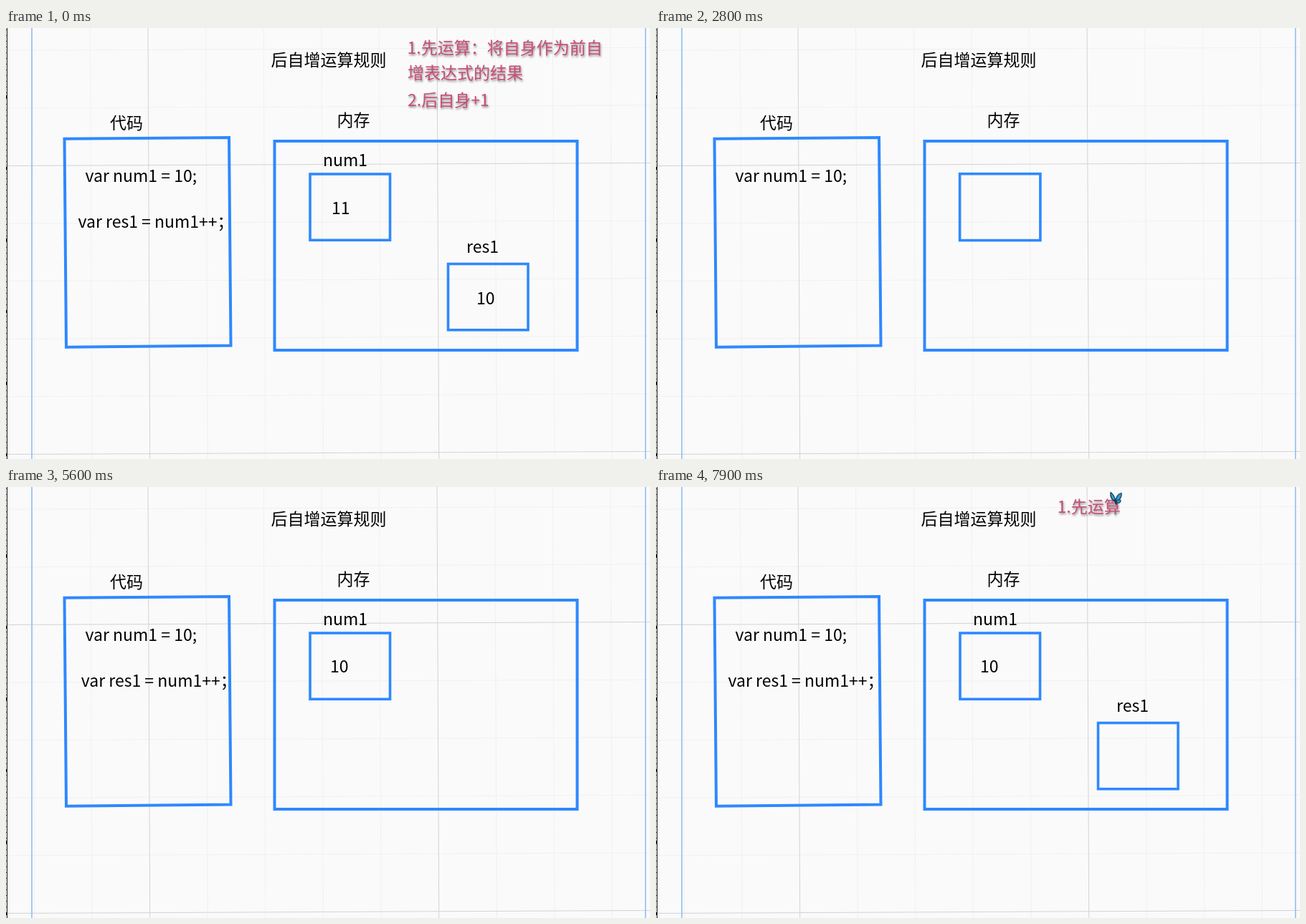
An HTML page with a canvas for the animation above (8000 ms loop, 898 by 602 pixels).

```html
<!DOCTYPE html>
<html lang="zh-CN">
<head>
<meta charset="utf-8">
<style>
  html, body { margin: 0; width: 100%; height: 100%; overflow: hidden; background: #fafafa; }
  canvas { display: block; }
</style>
</head>
<body>
<canvas id="stage" width="898" height="602"></canvas>
<script>
const ctx = document.getElementById('stage').getContext('2d');
const LOOP = 8000, STEP = 100, CLEAR = 1100;
const BLUE = '#2f88ff', PINK = '#c94c76';
const FONT = '23px "Noto Sans CJK SC", "Noto Sans CJK", "Noto Sans", sans-serif';

// [progress, value] keys; each segment eases out
const SLIDE = [[0, -3000], [.6, 25], [.75, -10], [.9, 5], [1, 0]];
const POP = [[0, .3], [.2, 1.1], [.4, .9], [.6, 1.03], [.8, .97], [1, 1]];
const easeOut = p => 1 - (1 - p) ** 3;

function sample(keys, p) {
  if (p >= 1) return keys[keys.length - 1][1];
  const i = keys.findIndex(k => k[0] > p);
  const [p0, v0] = keys[i - 1], [p1, v1] = keys[i];
  return v0 + (v1 - v0) * easeOut((p - p0) / (p1 - p0));
}

function text(str, x, y, color = '#000') {
  ctx.fillStyle = color;
  ctx.fillText(str, x, y);
}

function line(x0, y0, x1, y1, color, width = 1) {
  ctx.strokeStyle = color;
  ctx.lineWidth = width;
  ctx.beginPath();
  ctx.moveTo(x0, y0);
  ctx.lineTo(x1, y1);
  ctx.stroke();
}

function box(x, y, w, h, width = 3.6) {
  ctx.strokeStyle = BLUE;
  ctx.lineWidth = width;
  ctx.strokeRect(x, y, w, h);
}

function grid() {
  const gap = 80.6, slope = .0045;
  for (const strong of [false, true]) {
    const color = strong ? '#d3d3d3' : '#f1f1f1';
    for (let i = -2; i < 9; i++) {
      if ((i % 5 === 0) !== strong) continue;
      const x = 198 + i * gap, y = 192.5 + i * gap;
      line(x, 0, x + 602 * slope, 602, color);
      line(0, y, 898, y - 898 * slope, color);
    }
  }
}

function backdrop() {
  ctx.fillStyle = '#fafafa';
  ctx.fillRect(0, 0, 898, 602);
  grid();
  line(36, 0, 36, 602, '#8fbdf6', 1.6);
  line(891.7, 0, 891.7, 602, '#8fbdf6', 1.6);
  line(1.5, 0, 1.5, 602, '#111');
  ctx.fillStyle = '#555';
  for (let y = 2; y < 602; y += 8) ctx.fillRect(0, y, 1, 1);
  ctx.fillStyle = '#111';
  for (let y = 94; y < 602; y += 100) ctx.fillRect(0, y, 1, 4);

  text('后自增运算规则', 369.5, 53);
  text('代码', 145, 141);
  text('内存', 461.5, 137);
  ctx.strokeStyle = BLUE;
  ctx.lineWidth = 4;
  ctx.stroke(new Path2D('M81.5 154.7L311 153L313.5 443.5L84 445.7Z'));
  box(374.5, 158, 422, 292, 4);
}

function slideIn(t, start, draw) {
  const p = (t - start) / 1000;
  if (p < 0) return;
  ctx.save();
  ctx.globalAlpha = easeOut(Math.min(1, p / .6));
  ctx.translate(sample(SLIDE, p), 0);
  draw();
  ctx.restore();
}

function popIn(t, { start, cx, cy, draw, span = 1000, tilt = 0 }) {
  const p = (t - start) / span;
  if (p < 0) return;
  const s = sample(POP, p);
  ctx.save();
  ctx.translate(cx, cy);
  if (p < 1) ctx.rotate(tilt);
  ctx.scale(s, s);
  ctx.translate(-cx, -cy);
  draw();
  ctx.restore();
}

const pops = [
  { start: 2170, cx: 479.7, cy: 250.2, draw: () => box(424, 204, 111.5, 92.3) },
  { start: 3170, cx: 474, cy: 185, draw: () => text('num1', 442, 193) },
  { start: 5870, cx: 672.3, cy: 375.8, tilt: -.009, draw: () => box(616.5, 329.5, 111.5, 92.3) },
  { start: 6770, cx: 666, cy: 306, draw: () => text('res1', 642, 314) }
];
const ten = { start: 4070, cx: 465, cy: 250, span: 800, draw: () => text('10', 452, 258.5) };

function note(lines) {
  ctx.save();
  ctx.shadowColor = 'rgba(0,0,0,.45)';
  ctx.shadowBlur = 3;
  ctx.shadowOffsetX = 1;
  ctx.shadowOffsetY = 2;
  for (const [str, x, y] of lines) text(str, x, y, PINK);
  ctx.restore();
}

const NOTES = [
  ['1.先运算：将自身作为前自', 559.5, 36.3],
  ['增表达式的结果', 560, 70.5],
  ['2.后自身+1', 560, 108.5]
];

function butterfly(x, y) {
  ctx.save();
  ctx.translate(x, y);
  ctx.fillStyle = '#2f9fd4';
  ctx.strokeStyle = '#17384e';
  ctx.lineWidth = 1.2;
  for (const d of [
    'M0 4C-1 -2 -4 -7 -7 -9C-8 -4 -6 2 0 4Z',
    'M0 4C0 -2 3 -7 8 -8C9 -3 6 2 0 4Z',
    'M0 4C4 0 7 1 7 3C6 6 3 7 0 4Z'
  ]) {
    const wing = new Path2D(d);
    ctx.fill(wing);
    ctx.stroke(wing);
  }
  line(-2, 1, 1, 8, '#17384e', 2);
  ctx.restore();
}

function writeNote(t) {
  if (t < 7600) return;
  const edge = 566 + (t - 7600) * .27;
  ctx.save();
  ctx.beginPath();
  ctx.rect(540, 0, edge - 540, 48);
  ctx.clip();
  note(NOTES.slice(0, 1));
  ctx.restore();
  butterfly(edge - 6, 16.5);
}

function render(t) {
  ctx.font = FONT;
  backdrop();
  const full = t < CLEAR;
  const at = full ? LOOP * 2 : t;
  slideIn(at, 1080, () => text('var num1 = 10;', 110.5, 215));
  slideIn(at, 4756, () => text('var res1 = num1++；', 100.5, 278.5));
  pops.forEach(p => popIn(at, p));
  if (full) {
    text('11', 454, 260);
    text('10', 656, 385.5);
    note(NOTES);
  } else {
    popIn(t, ten);
    writeNote(t);
  }
}

const begin = performance.now();
function tick() {
  const t = (performance.now() - begin) % LOOP;
  render(Math.floor(t / STEP) * STEP);
  requestAnimationFrame(tick);
}
tick();
</script>
</body>
</html>
```
